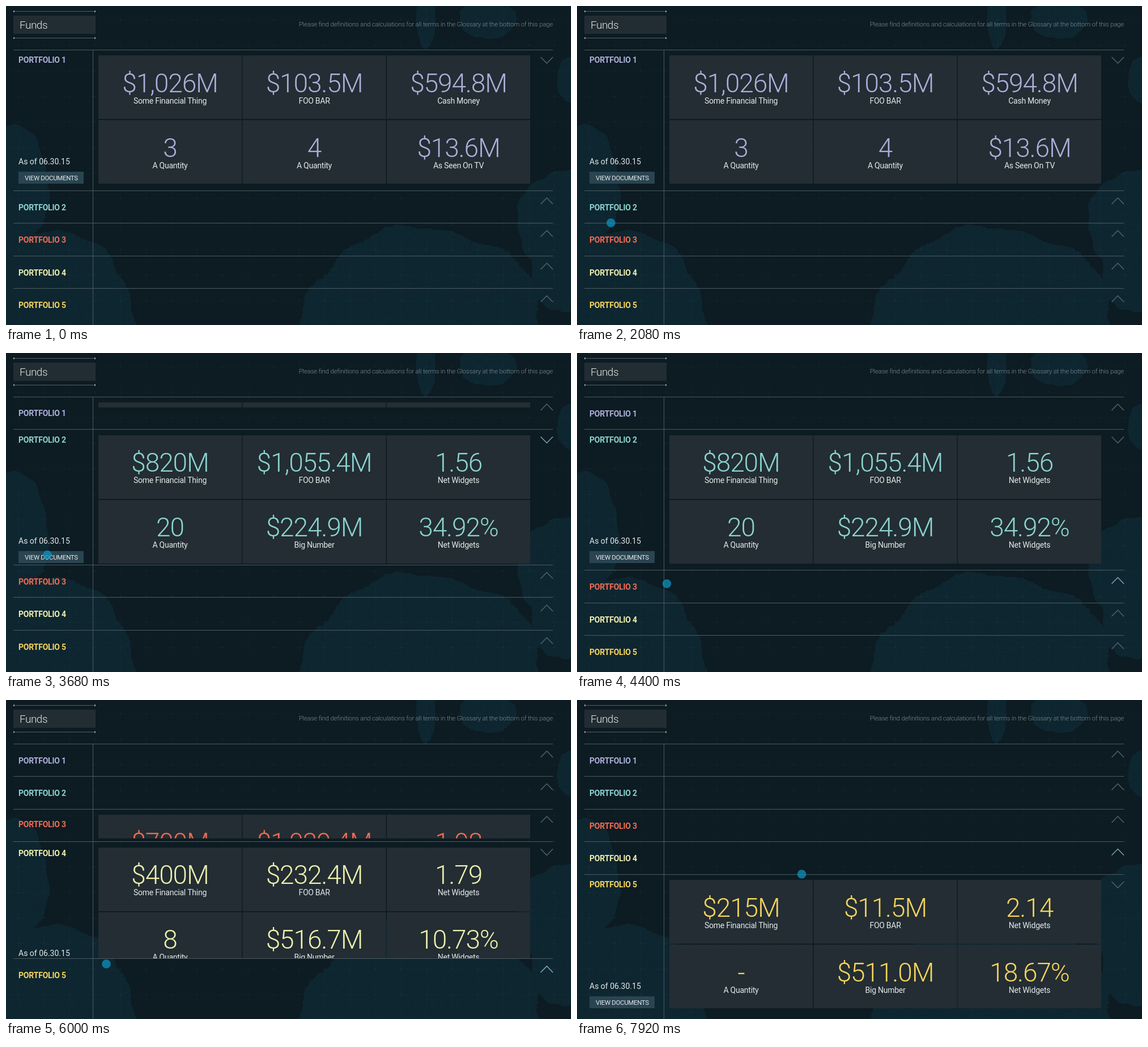
An HTML page with a canvas for the animation above (8 s loop, 997 by 562 pixels).

```html
<!DOCTYPE html>
<html lang="en">
<head>
<meta charset="utf-8">
<title>Funds</title>
<style>
html, body { margin: 0; width: 100%; height: 100%; overflow: hidden; background: #0d1b22; }
canvas { display: block; }
</style>
</head>
<body>
<canvas id="stage" width="997" height="562"></canvas>
<script>
const W = 997, H = 562, LOOP = 8000, STEP = 80;
const TOP = 77, CLOSED = 57.5, PAD = 10.5, PANEL = 237.5, SLIDE = 400;
const LEFT = 13, RIGHT = 965, LINE = '#4b5b61', WHITE = '#e4e9ea';
const ctx = document.getElementById('stage').getContext('2d');

const COLORS = ['#abb0da', '#8bd4d0', '#f26c52', '#eef0ae', '#f6d55d'];
const VALUES = [
  '$1,026M $103.5M $594.8M 3 4 $13.6M',
  '$820M $1,055.4M 1.56 20 $224.9M 34.92%',
  '$700M $1,039.4M 1.98 21 $452.2M 24.17%',
  '$400M $232.4M 1.79 8 $516.7M 10.73%',
  '$215M $11.5M 2.14 - $511.0M 18.67%'
].map(line => line.split(' '));
const FIRST_NAMES = ['Some Financial Thing', 'FOO BAR', 'Cash Money', 'A Quantity', 'A Quantity', 'As Seen On TV'];
const OTHER_NAMES = ['Some Financial Thing', 'FOO BAR', 'Net Widgets', 'A Quantity', 'Big Number', 'Net Widgets'];

// when each row opens; the row above closes at the same time
const OPENS = [-SLIDE, 3330, 4585, 5710, 7165, Infinity];
const HOVER_FROM = 2320;
// pointer moves: start, end, x, y reached
const MOVES = [
  [0, 80, 678, 4], [80, 240, 596, 99], [400, 1040, 257.5, 156.5], [1120, 1680, 65, 362],
  [1840, 2160, 59, 385], [2240, 2720, 73, 355.5], [4000, 4400, 158.5, 406.5],
  [5200, 5680, 177, 465], [6560, 7040, 203, 535], [7760, 7920, 396.5, 306.8]
];

let seed = 7;
const rnd = () => (seed = seed * 16807 % 2147483647) / 2147483647;

function ease(t, start, end) {
  const f = Math.min(1, Math.max(0, (t - start) / (end - start)));
  return .5 - Math.cos(Math.PI * f) / 2;
}

function rect(c, color, x, y, w, h) {
  c.fillStyle = color;
  c.fillRect(x, y, w, h);
}

function text(str, x, y, size, weight, color, spacing = 0, align = 'left') {
  ctx.font = `${weight} ${size}px Roboto, "Open Sans", sans-serif`;
  ctx.letterSpacing = spacing + 'px';
  ctx.textAlign = align;
  ctx.fillStyle = color;
  ctx.fillText(str, x, y);
}

// a land mass: an ellipse with a wavy, ragged coast and a fine stipple
function land(c, x, y, rx, ry) {
  const phase = rnd() * 6;
  c.save();
  c.beginPath();
  for (let a = 0; a < Math.PI * 2; a += .02) {
    const r = 1 + .03 * Math.sin(5 * a + phase) + .02 * Math.sin(13 * a) + (rnd() - .5) * .02;
    c.lineTo(x + rx * r * Math.cos(a), y + ry * r * Math.sin(a));
  }
  c.fillStyle = '#0e2630';
  c.fill();
  c.clip();
  for (let n = rx * ry / 6; n > 0; n--) {
    const tint = rnd() < .5 ? 'rgba(60,130,150,.08)' : 'rgba(0,0,0,.1)';
    rect(c, tint, x + (rnd() * 2 - 1) * rx, y + (rnd() * 2 - 1) * ry, 1.3, 1.3);
  }
  c.restore();
}

function makeBackdrop() {
  const cv = document.createElement('canvas');
  cv.width = W;
  cv.height = H;
  const c = cv.getContext('2d');
  rect(c, '#0d1b22', 0, 0, W, H);
  land(c, 0, 320, 75, 115);
  land(c, 55, 562, 175, 170);
  land(c, 735, 562, 212, 172);
  land(c, 985, 380, 84, 90);
  land(c, 985, 470, 58, 70);
  land(c, 741, 20, 17, 56);
  land(c, 850, 22, 50, 36);
  land(c, 1000, 130, 28, 42);
  for (let x = 22; x < W; x += 45) rect(c, 'rgba(120,180,195,.02)', x, 0, 1, H);
  for (let y = 24; y < H; y += 45) {
    rect(c, 'rgba(120,180,195,.02)', 0, y, W, 1);
    for (let x = 22; x < W; x += 45) rect(c, 'rgba(120,180,195,.08)', x - 1, y - 1, 2, 2);
  }
  return cv;
}
const backdrop = makeBackdrop();

function header() {
  rect(ctx, '#222d33', LEFT, 17, 145, 32);
  for (const y of [9, 56]) {
    rect(ctx, '#526167', LEFT, y, 145, 1);
    for (const x of [LEFT, 156]) rect(ctx, '#8b999e', x, y - 1, 2, 3);
  }
  text('Funds', 24, 40, 19, 300, WHITE, -.5);
  text('Please find definitions and calculations for all terms in the Glossary at the bottom of this page',
    RIGHT, 36, 11.5, 300, '#7f8b90', -.22, 'right');
}

function panel(i, top, height) {
  const y0 = Math.floor(top + PAD);
  ctx.save();
  ctx.beginPath();
  ctx.rect(0, y0, W, height);
  ctx.clip();
  text('As of 06.30.15', 22, top + 201.5, 14, 400, WHITE);
  rect(ctx, '#2a4551', 22, Math.floor(top + 215), 115, 21);
  text('VIEW DOCUMENTS', 33, top + 229.5, 11.5, 400, WHITE, -.35);
  const names = i ? OTHER_NAMES : FIRST_NAMES;
  VALUES[i].forEach((value, n) => {
    const x = 163 + n % 3 * 254.5, mid = x + 126.5, down = n > 2 ? 114 : 0;
    rect(ctx, '#232d33', x, y0 + down, 253, 112);
    text(value, mid, top + 74.5 + down, 46, 300, COLORS[i], -1.1, 'center');
    text(names[n], mid, top + 94.5 + down, 14, 400, WHITE, -.25, 'center');
  });
  ctx.restore();
}

function chevron(top, open, lit) {
  const y = top + 18.5, d = open ? 5.5 : -5.5;
  ctx.beginPath();
  ctx.moveTo(943.5, y - d);
  ctx.lineTo(954.3, y + d);
  ctx.lineTo(RIGHT, y - d);
  ctx.strokeStyle = lit ? '#7aa5b3' : '#52636a';
  ctx.lineWidth = 1.5;
  ctx.stroke();
}

function rows(t, pointerY) {
  let top = TOP;
  COLORS.forEach((color, i) => {
    const [from, to] = [OPENS[i], OPENS[i + 1]];
    const p = ease(t, from, from + SLIDE) - (t > to ? ease(t, to, to + SLIDE) : 0);
    const height = Math.max(CLOSED, PAD + PANEL * p);
    const lit = t >= HOVER_FROM && pointerY >= top && pointerY < top + height;
    rect(ctx, LINE, LEFT, Math.floor(top), RIGHT - LEFT, 1);
    if (p > 0) panel(i, top, PANEL * p);
    text('PORTFOLIO ' + (i + 1), 22, top + 34.5 - 11.5 * p, 14, 700, color, -.2);
    chevron(top, t >= from && t < to, lit);
    top += height;
  });
  rect(ctx, LINE, 153, TOP, 1, H - TOP);
}

// each move sags a little below the straight line
function pointerAt(t) {
  let [, , x, y] = MOVES[0];
  for (const [start, end, nx, ny] of MOVES) {
    const f = ease(t, start, end), sag = .15 * Math.abs(nx - x) * Math.sin(Math.PI * f);
    x += (nx - x) * f;
    y += (ny - y) * f + sag;
    if (t < end) break;
  }
  return [x, y];
}

function frame(now) {
  const t = Math.floor(now % LOOP / STEP) * STEP;
  const [x, y] = pointerAt(t);
  ctx.drawImage(backdrop, 0, 0);
  header();
  rows(t, y);
  if (t >= STEP) {
    ctx.beginPath();
    ctx.arc(x, y, 7.8, 0, 7);
    ctx.fillStyle = 'rgba(14,146,190,.75)';
    ctx.fill();
  }
  requestAnimationFrame(frame);
}
requestAnimationFrame(frame);
</script>
</body>
</html>
```
